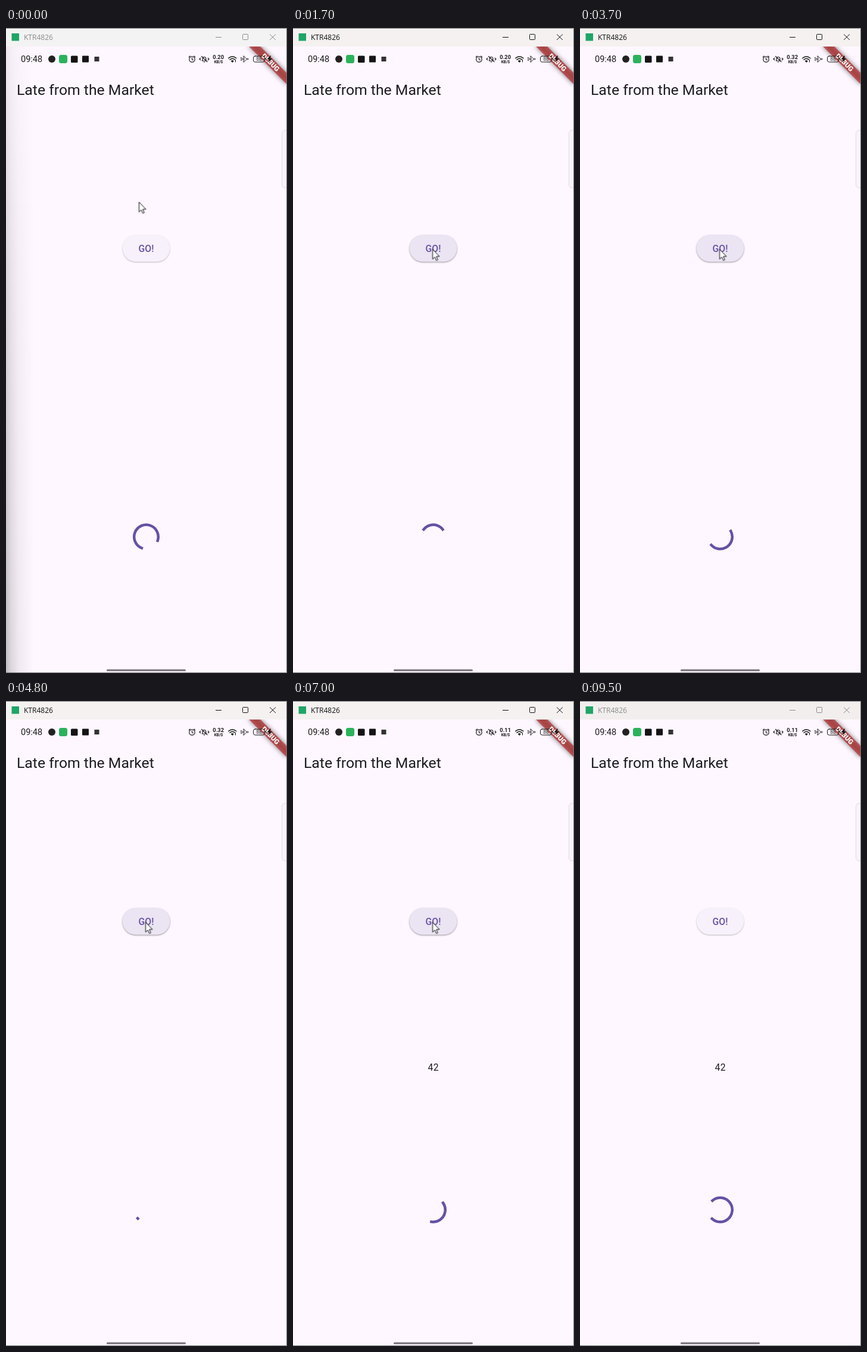
Write an HTML page that moves like this. It is 472 px wide and 1080 px high and loops after 9600 ms.

```html
<!DOCTYPE html>
<html lang="en">
<head>
<meta charset="utf-8">
<title>Loading demo</title>
<style>
html, body { margin: 0; width: 100%; height: 100%; overflow: hidden; background: #fef7ff; }
svg { display: block; width: 472px; height: 1080px; font-family: Roboto, sans-serif; }

.bar, .ink, .speed text, .result { animation: 9.6s step-end infinite; }
.cursor, .hover, .shade { animation: 9.6s linear infinite; }

.bar { animation-name: bar; }
.ink { animation-name: ink; }
.speed .first { animation-name: first; }
.speed .second { animation-name: second; }
.speed .third { animation-name: third; }
.result { animation-name: result; }
.cursor { animation-name: cursor; animation-timing-function: ease-in-out; }
.hover { animation-name: hover; }
.shade { animation-name: shade; }

@keyframes bar { 0% { fill: #f3f3f3 } 7.3% { fill: #f4f1f0 } 96% { fill: #f2eeee } }
@keyframes ink { 0% { color: #8b8b8b } 7.3% { color: #111 } 96% { color: #8b8b8b } }
@keyframes first { 0% { opacity: 1 } 21.8%, 100% { opacity: 0 } }
@keyframes second { 0% { opacity: 0 } 21.8% { opacity: 1 } 67.7%, 100% { opacity: 0 } }
@keyframes third { 0% { opacity: 0 } 67.7%, 100% { opacity: 1 } }
@keyframes result { 0% { opacity: 0 } 60.4%, 100% { opacity: 1 } }
@keyframes cursor {
  0%, 1% { transform: translate(223.5px, 291.5px) }
  6%, 90.6% { transform: translate(234.5px, 370.5px) }
  93.2%, 100% { transform: translate(482px, 410px) }
}
@keyframes hover { 0%, 4.6% { opacity: 0 } 6.4%, 91.2% { opacity: 1 } 93.2%, 100% { opacity: 0 } }
@keyframes shade { 0%, 7.2% { opacity: 1 } 8.2%, 100% { opacity: 0 } }

.low { filter: drop-shadow(0 1px .8px rgba(0,0,0,.26)); }
.high { filter: drop-shadow(0 1.5px 1.8px rgba(0,0,0,.2)); }
.line { fill: none; stroke: #1b1b1b; stroke-width: 1.2; stroke-linecap: round; stroke-linejoin: round; }
</style>
</head>
<body>
<svg viewBox="0 0 472 1080">
  <defs>
    <linearGradient id="side">
      <stop offset="0" stop-opacity=".24"/>
      <stop offset=".2" stop-opacity=".13"/>
      <stop offset=".45" stop-opacity=".06"/>
      <stop offset="1" stop-opacity="0"/>
    </linearGradient>
    <linearGradient id="fade" x2="0" y2="1">
      <stop offset="0" stop-color="#fff" stop-opacity=".25"/>
      <stop offset=".4" stop-color="#fff" stop-opacity=".65"/>
      <stop offset="1" stop-color="#fff"/>
    </linearGradient>
    <mask id="top"><rect y="31" width="48" height="1049" fill="url(#fade)"/></mask>
    <filter id="soft" x="-30%" y="-150%" width="160%" height="400%"><feGaussianBlur stdDeviation="4.2"/></filter>
    <clipPath id="screen"><rect y="31" width="471" height="1048"/></clipPath>
  </defs>

  <!-- app surface -->
  <rect width="472" height="1080" fill="#fef7ff"/>
  <text x="18" y="112" font-size="24.75" fill="#1d1b20">Late from the Market</text>
  <path d="M472 171.5H469Q463.5 171.5 463.5 177V262Q463.5 267.5 469 267.5H472" fill="#f9f3fb" stroke="#e0dbe2"/>

  <rect class="low" x="195.8" y="346.8" width="79.4" height="44.4" rx="22.2" fill="#f7f1fb"/>
  <g class="hover"><rect class="high" x="195.8" y="346.8" width="79.4" height="44.4" rx="22.2" fill="#ebe4f3"/></g>
  <text x="235.5" y="374.5" font-size="15.75" font-weight="500" letter-spacing=".1" text-anchor="middle" fill="#6750a4">GO!</text>

  <text class="result" x="235.7" y="619" font-size="15.75" letter-spacing=".28" text-anchor="middle" fill="#1d1b20">42</text>
  <circle id="arc" cx="235.5" cy="852" r="20.25" pathLength="360" fill="none" stroke="#6750a4" stroke-width="4.5" stroke-linecap="square"/>
  <rect x="169" y="1073.8" width="133" height="3.2" rx="1.6" fill="#7f7b81"/>

  <!-- corner ribbon -->
  <g clip-path="url(#screen)">
    <g transform="translate(471.5 30.6) rotate(45)">
      <rect x="-45" y="31.5" width="90" height="13.5" opacity=".5" filter="url(#soft)"/>
      <rect x="-45" y="31.5" width="90" height="13.5" fill="#b71c1c" fill-opacity=".627"/>
      <text y="42.3" font-size="11.5" font-weight="900" text-anchor="middle" fill="#fff">DEBUG</text>
    </g>
  </g>

  <!-- status bar -->
  <text x="25" y="57" font-size="14.5" fill="#1b1b1b">09:48</text>
  <circle cx="77" cy="52" r="6" fill="#222"/>
  <rect x="89" y="45" width="14" height="14" rx="3.5" fill="#2bb35c"/>
  <rect x="109" y="46.5" width="11.5" height="11.5" rx="1.5" fill="#151515"/>
  <rect x="128" y="46.5" width="11" height="11" rx="1" fill="#151515"/>
  <rect x="148.5" y="48" width="8" height="8" fill="#333"/>

  <g class="line">
    <circle cx="312.5" cy="52.5" r="4.7"/>
    <path d="M312.5 50V52.8L314.3 53.8M307.3 48.8L309.3 47M317.7 48.8L315.7 47"/>
    <path d="M329.5 55H336.5L335.8 53V51Q335.5 48.5 333 48.5T330.2 51V53ZM328.500 47.5L338 56.5M332.3 57H333.7"/>
    <path d="M326.8 50.3L325 52L326.8 53.7M339.2 50.3L341 52L339.2 53.7"/>
    <path d="M373.8 50.5Q380.3 45 386.8 50.5M376 53Q380.3 49.5 384.6 53" stroke-width="1.6"/>
    <path d="M378.5 55.3Q380.3 54 382 55.3L380.3 57Z" fill="#1b1b1b"/>
    <path d="M385.5 53.5V57" stroke-width="1"/>
    <path d="M394.5 49.8H395.8L397 51.2H400.3L398.5 47H399.8L403.5 51.2H406.500Q408.5 52 406.5 52.8H403.5L399.8 57H398.5L400.3 52.8H397L395.8 54.2H394.5L395.2 52Z" stroke-width=".9"/>
    <rect x="415.5" y="47" width="19" height="10" rx="3" stroke-width="1"/>
    <path d="M436.5 50.5V53.5"/>
  </g>
  <text x="425" y="55.2" font-size="8.5" text-anchor="middle" fill="#444">88</text>
  <path d="M443.5 46.5L438.5 52.5H442L441 57.5L447.5 51H443.8L445 46.5Z" fill="#1b1b1b"/>
  <g font-weight="700" text-anchor="middle" fill="#1b1b1b">
    <g class="speed" font-size="9.3">
      <text class="first" x="356.7" y="52">0.20</text>
      <text class="second" x="356.7" y="52">0.32</text>
      <text class="third" x="356.7" y="52">0.11</text>
    </g>
    <text x="357" y="58.5" font-size="6.5">KB/S</text>
  </g>

  <g class="shade"><rect y="31" width="46" height="1049" fill="url(#side)" mask="url(#top)"/></g>

  <!-- window frame -->
  <rect class="bar" width="472" height="31" fill="#f3f3f3"/>
  <rect x="9.5" y="9" width="12.5" height="12.5" fill="#1fa567"/>
  <g class="ink">
    <text x="30" y="20" font-family="Open Sans, sans-serif" font-size="12" fill="currentColor">KTR4826</text>
    <g fill="none" stroke="currentColor">
      <path d="M352 15.5H362M443 10.5L453 20M453 10.5L443 20"/>
      <rect x="397.5" y="10.5" width="9" height="9" rx="1"/>
    </g>
  </g>
  <path d="M0 .5H471.5V1079.5H0" fill="none" stroke="#77747a"/>

  <path class="cursor" d="M0 0V16.5L3.7 13L6.3 18.8L8.8 17.7L6.3 12H11.5Z" fill="#fff" stroke="#000"/>
</svg>
<script>
const LOOP = 9600, SWEEP = 1333, TURN = 2222;
const arc = document.getElementById('arc');

// cubic-bezier(.4, 0, .2, 1)
function ease(x) {
  if (x <= 0) return 0;
  if (x >= 1) return 1;
  let lo = 0, hi = 1;
  for (let i = 0; i < 24; i++) {
    const s = (lo + hi) / 2, r = 1 - s;
    if (1.2 * s * r * r + 0.6 * s * s * r + s * s * s < x) lo = s; else hi = s;
  }
  return lo * lo * (3 - 2 * lo);
}

function draw(t) {
  const p = (t + 565) % SWEEP / SWEEP;
  const turn = (t + 1010) % TURN / TURN;
  const head = ease(p * 2), tail = ease(p * 2 - 1);
  const start = 270 * tail + 360 * turn + 90 * p - 90;
  const sweep = Math.max(270 * (head - tail), 0.06);
  arc.setAttribute('transform', `rotate(${start} 235.5 852)`);
  arc.setAttribute('stroke-dasharray', `${sweep} 360`);
}

const t0 = performance.now();
function tick() {
  draw((performance.now() - t0) % LOOP);
  requestAnimationFrame(tick);
}
tick();
</script>
</body>
</html>
```
